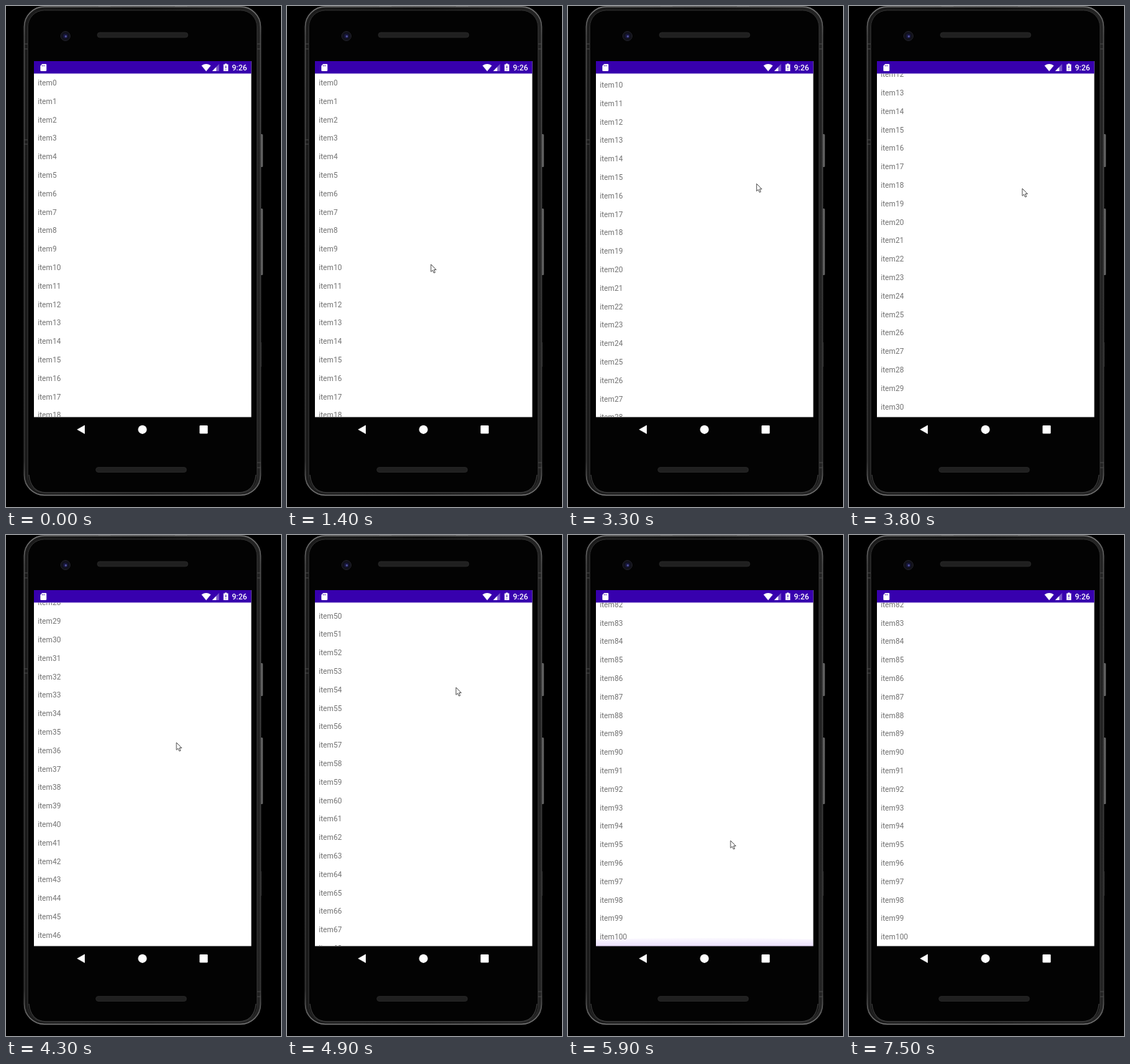
An HTML page that plays this animation: 384x700 px, repeating every 8.1 s.

```html
<!DOCTYPE html>
<html lang="en">
<head>
<meta charset="utf-8">
<title>Scrolling list</title>
<style>
  html, body { margin: 0; width: 100%; height: 100%; overflow: hidden; background: #000; }
  svg { display: block; width: 384px; height: 700px; }
  text { font-family: Roboto, sans-serif; font-size: 10.4px; }
  #list { fill: #727272; }
</style>
</head>
<body>
<svg viewBox="0 0 384 700">
  <defs>
    <clipPath id="screen"><rect x="39" y="94.4" width="303.5" height="480"/></clipPath>
    <linearGradient id="rim" x2="0" y2="1">
      <stop offset="0" stop-color="#777"/>
      <stop offset=".06" stop-color="#4c4c4c"/>
      <stop offset=".5" stop-color="#3a3a3a"/>
      <stop offset=".93" stop-color="#353535"/>
      <stop offset="1" stop-color="#777"/>
    </linearGradient>
    <linearGradient id="side">
      <stop offset="0" stop-color="#1b1b1b"/>
      <stop offset=".5" stop-color="#111"/>
      <stop offset="1" stop-color="#242424"/>
    </linearGradient>
    <linearGradient id="key">
      <stop offset="0" stop-color="#222"/>
      <stop offset=".6" stop-color="#777"/>
      <stop offset="1" stop-color="#333"/>
    </linearGradient>
    <linearGradient id="shade" x2="0" y2="1">
      <stop offset="0" stop-color="#6200ee" stop-opacity=".02"/>
      <stop offset="1" stop-color="#6200ee" stop-opacity=".13"/>
    </linearGradient>
  </defs>

  <!-- phone -->
  <g fill="url(#key)">
    <rect x="354" y="179" width="5" height="46" rx="1.5"/>
    <rect x="354" y="283" width="5" height="93" rx="1.5"/>
  </g>
  <rect x="25.5" y="1" width="330" height="682.5" rx="28" fill="url(#side)" stroke="url(#rim)" stroke-width="1.6"/>
  <rect x="30.5" y="6" width="320" height="674" rx="23" fill="#030303" stroke="#303030"/>
  <path d="M32 655Q34 679 56 680H325Q347 679 349 655" fill="none" stroke="#393939" stroke-width="1.3"/>
  <path d="M129 .6h17M236 .6h17" stroke="#666" stroke-width="1.2"/>
  <path d="M25 53h5m-5 7h5M351 53h5m-5 7h5M25 187h5m-5 6h5M351 638h5m-5 7h5" stroke="#4a4a4a"/>
  <path d="M356.5 470v34" stroke="#292929"/>
  <rect x="127.5" y="37" width="126.500" height="7" rx="3.5" fill="#202020" stroke="#2c2c2c" stroke-width=".7"/>
  <rect x="125.500" y="644.5" width="126.500" height="7" rx="3.5" fill="#202020" stroke="#2c2c2c" stroke-width=".7"/>
  <circle cx="83" cy="42" r="6.500" fill="#11111a" stroke="#222229"/>
  <circle cx="83" cy="42" r="3.300" fill="#17173c"/>
  <circle cx="83.500" cy="42.5" r="1.400" fill="#5555a0"/>

  <!-- screen -->
  <rect x="39" y="77" width="303.5" height="497.4" fill="#fff"/>
  <g clip-path="url(#screen)">
    <g id="list"></g>
    <path id="glow" d="M39 565Q190.500 561 342.5 565V575H39Z" fill="url(#shade)"/>
  </g>
  <rect x="39" y="77" width="303.5" height="17.4" fill="#3700ae"/>
  <g fill="#fff">
    <path d="M50.500 81H55.500Q56.500 81 56.500 82V90Q56.500 91 55.500 91H49Q48 91 48 90V83.500Z"/>
    <path d="M273 83.300Q279.500 78.600 286 83.300L279.500 91.200Z"/>
    <path d="M297.500 81V91H288Z" opacity=".35"/>
    <path d="M293.500 85.200V91H288Z"/>
    <path d="M305.700 80.500H308.300V81.600H310.300V91H303.700V81.600H305.700Z"/>
    <text x="315.500" y="89.700" font-weight="500" style="font-size:10.7px">9:26</text>
    <path d="M99 591.700L110 585.500V598Z"/>
    <circle cx="190.500" cy="591.800" r="6.100"/>
    <rect x="270.300" y="586" width="11.400" height="11.400" rx="1"/>
  </g>
  <path d="M50.500 82.500v1.800m1.600-1.800v1.800m1.600-1.800v1.800" stroke="#3700ae" stroke-width=".7"/>
  <path d="M307 83.500v3.600m0 1.300v1.100" stroke="#3700ae" stroke-width="1.100"/>
  <path id="cursor" d="M0 0V10.300L2.400 8.200L4.100 12L5.800 11.300L4.200 7.500H7.300Z" fill="#fff" stroke="#444" stroke-width=".9" stroke-linejoin="round"/>
</svg>

<script>
const LOOP = 8100, STEP = 100, ROW = 25.8, ITEMS = 101;
const END = ROW * ITEMS - 480;
const byId = id => document.getElementById(id);
const list = byId('list'), cursor = byId('cursor'), glow = byId('glow');

// Rows of [ms, value, ...]
const scrollSteps = [
  [2600, 0], [2900, 86], [3100, 185], [3300, 255], [3500, 287], [3700, 296],
  [3800, 321.4], [4000, 465], [4200, 655], [4400, 815], [4600, 930],
  [4800, 1130], [4900, 1284.5], [5100, 1560], [5300, 1765], [5500, 1905],
  [5700, 2050], [5800, END]
];
const cursorSteps = [
  [900, 176, 243], [1100, 168, 270], [1300, 196, 340], [1400, 201, 361],
  [1500, 201, 361], [1800, 207, 325], [2100, 212, 295], [2400, 304, 395],
  [2600, 310, 403], [2900, 305, 315], [3100, 290, 225], [3400, 250, 260],
  [3700, 243, 285], [3800, 242, 255], [4000, 238, 190], [4300, 238, 290],
  [4700, 240, 372], [4900, 236, 213], [5100, 235, 205], [5400, 231, 460],
  [5600, 238, 370], [5700, 240, 260], [5900, 227, 427], [6100, 240, 420],
  [6300, 243, 379]
];
const glowSteps = [[5700, 0], [5800, .7], [5900, 1], [6100, .7], [6400, 0]];

function valuesAt(steps, time) {
  const next = steps.findIndex(step => step[0] > time);
  if (next === 0) return steps[0].slice(1);
  if (next < 0) return steps[steps.length - 1].slice(1);
  const from = steps[next - 1], to = steps[next];
  const part = (time - from[0]) / (to[0] - from[0]);
  return from.slice(1).map((v, i) => v + (to[i + 1] - v) * part);
}

for (let i = 0; i < ITEMS; i++) {
  const label = document.createElementNS('http://www.w3.org/2000/svg', 'text');
  label.setAttribute('x', 44.4);
  label.setAttribute('y', 111 + i * ROW);
  label.textContent = 'item' + i;
  list.append(label);
}

function draw() {
  const time = Math.floor(performance.now() % LOOP / STEP) * STEP;
  const [scroll] = valuesAt(scrollSteps, time);
  const [x, y] = valuesAt(cursorSteps, time);
  list.setAttribute('transform', `translate(0 ${-scroll})`);
  cursor.setAttribute('transform', `translate(${x} ${y})`);
  cursor.setAttribute('visibility', time >= 900 && time < 6400 ? 'visible' : 'hidden');
  glow.setAttribute('opacity', valuesAt(glowSteps, time)[0]);
  requestAnimationFrame(draw);
}
draw();
</script>
</body>
</html>
```
